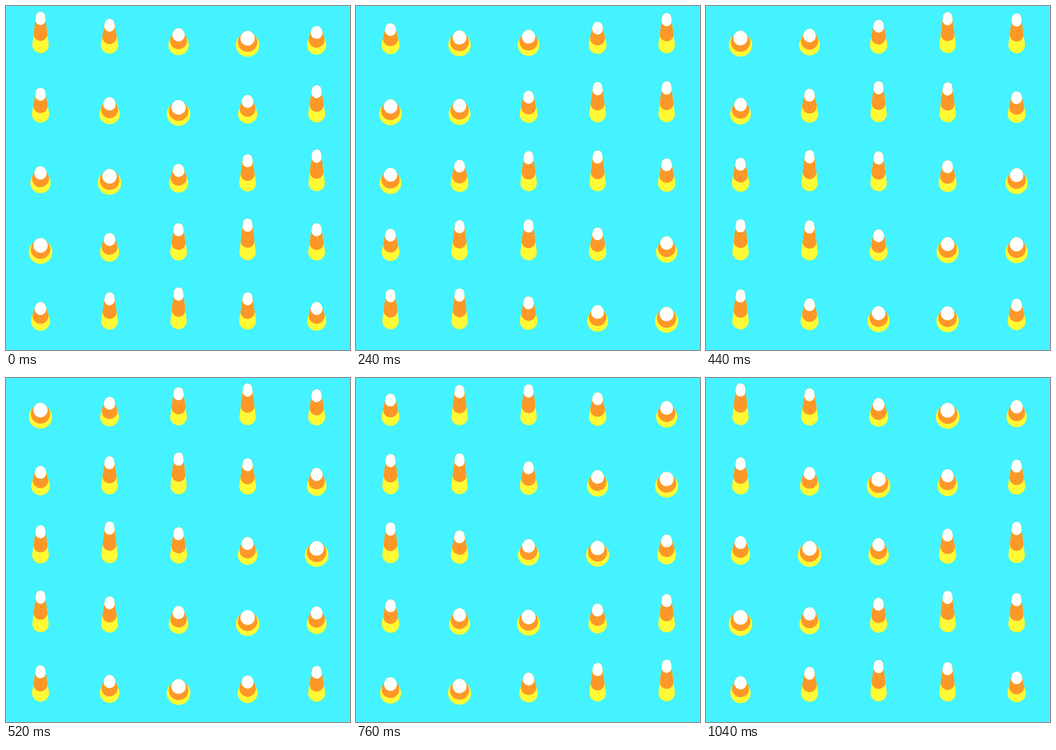
Recreate the animation shown at these times as an HTML page with a canvas. Size 600 by 600 pixels, loop 1080 ms.

```html
<!DOCTYPE html>
<html lang="en">
<head>
<meta charset="utf-8">
<title>Candy corn wave</title>
<style>
  html, body { margin: 0; width: 100%; height: 100%; overflow: hidden; background: #44f3ff; }
  canvas { display: block; width: 600px; height: 600px; }
</style>
</head>
<body>
<canvas id="stage" width="600" height="600"></canvas>
<script>
const ctx = document.getElementById('stage').getContext('2d');
const LOOP = 1080, STEP = 40;
const GRID = 5, PITCH = 120.4, LEFT = 60.2, TOP = 68;
const TIP = 0.55; // tip radius relative to base radius

// [where the band starts along the axis, colour]
const BANDS = [[0, '#fffa35'], [0.38, '#fd9828'], [0.87, '#ffffff']];

// [time in ms, wave angle in degrees]
const WAVE = [[0, 16.2], [240, 98.3], [440, 166.5], [600, 223],
              [760, 270.3], [880, 310.4], [1040, 360.6], [1080, 376.2]];

function waveAngle(t) {
  const i = WAVE.findIndex(p => p[0] > t);
  const [t0, a0] = WAVE[i - 1], [t1, a1] = WAVE[i];
  return (a0 + (a1 - a0) * (t - t0) / (t1 - t0)) * Math.PI / 180;
}

// Outline around two circles stacked on a vertical axis
function taper(x, y0, r0, y1, r1, color) {
  const a = Math.asin((r0 - r1) / (y0 - y1));
  ctx.beginPath();
  ctx.arc(x, y0, r0, -a, Math.PI + a);
  ctx.arc(x, y1, r1, Math.PI + a, 2 * Math.PI - a);
  ctx.closePath();
  ctx.fillStyle = color;
  ctx.fill();
}

function candy(x, y, angle) {
  const height = 31.85 + 18.85 * Math.cos(angle);
  const base = 12.05 + 112.5 / height;
  const radius = k => base * (1 - (1 - TIP) * k);
  for (const [k, color] of BANDS) {
    taper(x, y - k * height, radius(k), y - height, radius(1), color);
  }
}

function draw(t) {
  const angle = waveAngle(t);
  ctx.fillStyle = '#44f3ff';
  ctx.fillRect(0, 0, 600, 600);
  for (let row = 0; row < GRID; row++) {
    for (let col = 0; col < GRID; col++) {
      candy(LEFT + col * PITCH, TOP + row * PITCH, angle + row + col);
    }
  }
}

const start = performance.now();
function tick() {
  const t = (performance.now() - start) % LOOP;
  draw(Math.floor(t / STEP) * STEP);
  requestAnimationFrame(tick);
}
tick();
</script>
</body>
</html>
```
